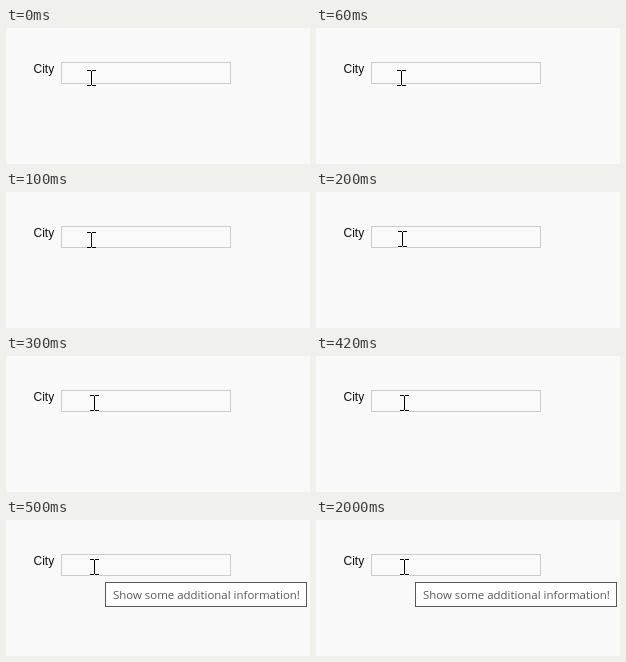
Animation of 304x136 px, one loop 3 s. Source, as an HTML page:

```html
<!DOCTYPE html>
<html lang="en">
<head>
<meta charset="utf-8">
<title>Text field with tooltip</title>
<style>
  html, body { margin: 0; width: 100%; height: 100%; overflow: hidden; background: #f9f9f9; }
  svg { display: block; width: 304px; height: 136px; }
  .label { font: 12px "Liberation Sans", Arial, sans-serif; fill: #111; }
  .hint { font: 11.45px "Open Sans", sans-serif; fill: #575757; }
  .box { stroke-width: 1; shape-rendering: crispEdges; }
  #cursor { fill: none; shape-rendering: crispEdges; }
</style>
</head>
<body>
<svg viewBox="0 0 304 136">
  <defs>
    <path id="beam" d="M-4 .5H0M1 .5H5M.5 1V15M-4 15.5H0M1 15.5H5"/>
  </defs>
  <text class="label" x="27.5" y="45">City</text>
  <rect class="box" x="55.5" y="34.5" width="169" height="21" fill="#fafafa" stroke="#ccc"/>
  <g id="tooltip" visibility="hidden">
    <rect class="box" x="99.5" y="62.5" width="201" height="24" fill="#fff" stroke="#575757"/>
    <text class="hint" x="107" y="79">Show some additional information!</text>
  </g>
  <g id="cursor">
    <use href="#beam" stroke="#fafafa" stroke-width="3"/>
    <use href="#beam" stroke="#000"/>
  </g>
</svg>
<script>
  const LOOP = 3000, STEP = 100, HINT_AT = 500;
  const stops = [[85, 42], [85, 40], [86, 39], [88, 39]];
  const cursor = document.getElementById('cursor');
  const tooltip = document.getElementById('tooltip');
  const start = performance.now();

  function draw(now) {
    const t = Math.max(0, now - start) % LOOP;
    const stop = stops[Math.min(stops.length - 1, Math.floor(t / STEP))];
    cursor.setAttribute('transform', `translate(${stop})`);
    tooltip.setAttribute('visibility', t < HINT_AT ? 'hidden' : 'visible');
    requestAnimationFrame(draw);
  }
  draw(start);
</script>
</body>
</html>
```
